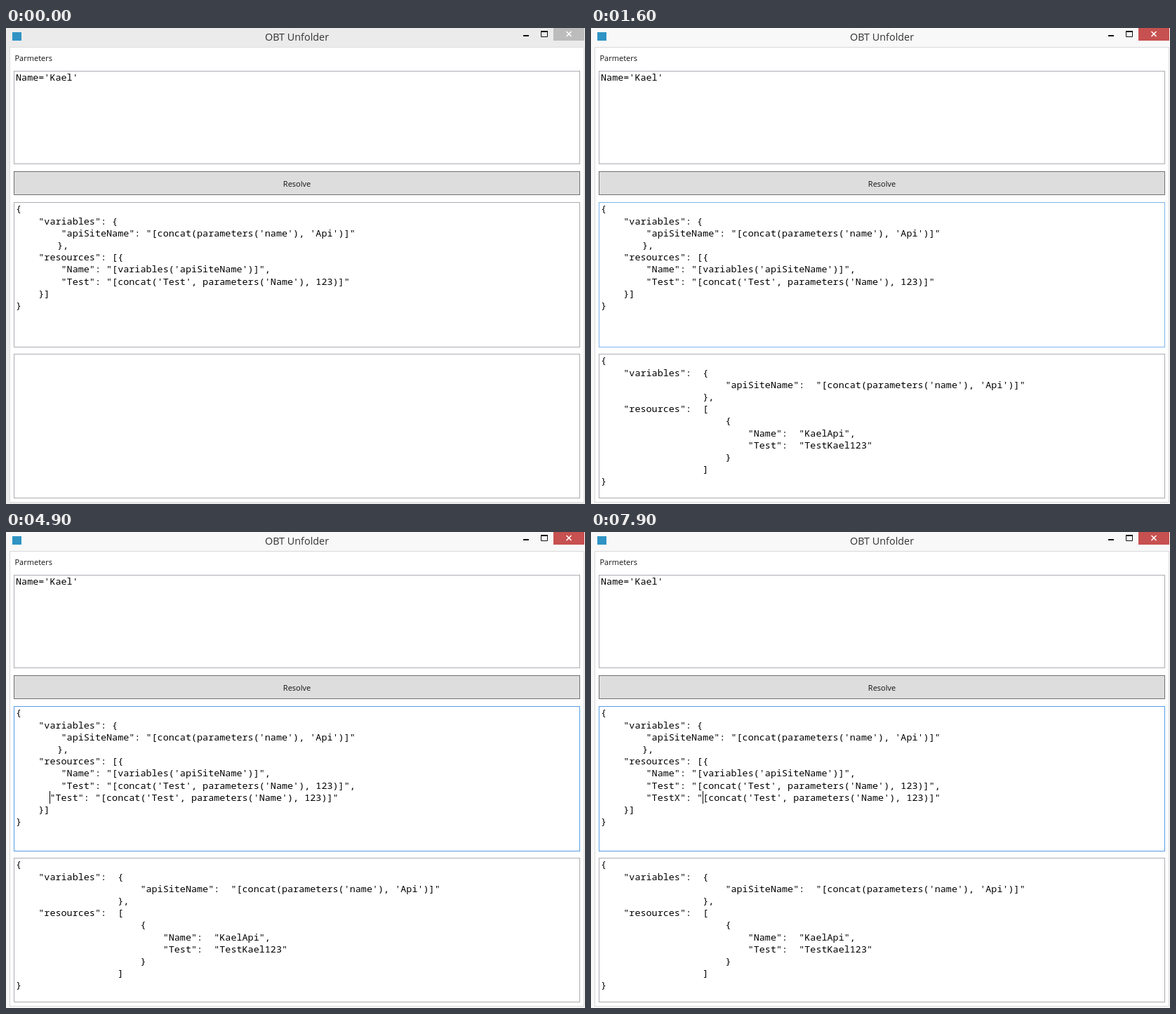
Write an HTML page that moves like this. It is 825 px wide and 678 px high and loops after 8000 ms.

```html
<!DOCTYPE html>
<html lang="en">
<head>
<meta charset="utf-8">
<title>OBT Unfolder</title>
<style>
  html, body { margin: 0; width: 100%; height: 100%; overflow: hidden; background: #fff; }
  svg { display: block; }
  .ui { font-family: "Open Sans", "Noto Sans", sans-serif; fill: #111; }
  .code { font: 13.45px "Noto Sans Mono", "DejaVu Sans Mono", monospace; white-space: pre; fill: #000; }
</style>
</head>
<body>
<svg id="stage" width="825" height="678" viewBox="0 0 825 678"></svg>
<script>
const LOOP = 8000;
const PERSON = 'Kael';
const BORDER = { idle: '#abadb3', hover: '#7eb4ea', focus: '#569de5' };
const BUTTON = {
  idle: ['#dddddd', '#707070'],
  hover: ['#bee6fd', '#3c7fb1'],
  pressed: ['#c4e5f6', '#2c628b']
};
const stage = document.getElementById('stage');

function add(tag, attrs, text) {
  const node = document.createElementNS('http://www.w3.org/2000/svg', tag);
  set(node, attrs);
  if (text) node.textContent = text;
  stage.append(node);
  return node;
}
function set(node, attrs) {
  for (const key in attrs) node.setAttribute(key, attrs[key]);
}
// Rectangle with a one pixel border lying inside the given edges.
function frame(left, top, right, bottom, fill, stroke) {
  return add('rect', {
    x: left + .5, y: top + .5, width: right - left - 1, height: bottom - top - 1, fill, stroke
  });
}
function label(text, x, y, size, anchor = 'start') {
  return add('text', { class: 'ui', x, y, 'font-size': size, 'text-anchor': anchor }, text);
}
// Empty lines of code for a text box whose border starts at boxTop.
function codeLines(count, boxTop) {
  return Array.from({ length: count }, (_, i) =>
    add('text', { class: 'code', x: 14, y: Math.round(boxTop + 14.4 + 17.2 * i) }));
}
function fillLines(nodes, lines) {
  nodes.forEach((node, i) => {
    const text = lines[i] || '';
    if (node.textContent !== text) node.textContent = text;
  });
}

// Window chrome
const chrome = add('rect', { width: 825, height: 678 });
const client = frame(5, 27, 824, 676, '#fff', '#d9d9d9');
add('rect', { x: 9, y: 6, width: 13, height: 12, fill: '#2f93c4' });
label('OBT Unfolder', 414.5, 17.5, 14.4, 'middle').style.fill = '#333';
add('rect', { x: 737, y: 10, width: 8, height: 2, fill: '#111' });
add('path', { d: 'M762.5 5V12.5H771.5V5M762 5H772', fill: 'none', stroke: '#111' });
add('rect', { x: 762, y: 4, width: 10, height: 2, fill: '#111' });
const closeButton = add('rect', { x: 780, y: 0, width: 44, height: 18 });
add('path', { d: 'M798.5 5L805.5 12M805.5 5L798.5 12', stroke: '#fff', 'stroke-width': 1.6 });

// Form
label('Parmeters', 12.5, 47, 11);
const paramBox = frame(11, 61, 818, 194, '#fff');
const button = frame(11, 204, 818, 238);
label('Resolve', 414.5, 226, 11, 'middle');
const sourceBox = frame(11, 248, 818, 455, '#fff');
frame(11, 464, 818, 670, '#fff', BORDER.idle);
fillLines(codeLines(1, 61), [`Name='${PERSON}'`]);
const sourceNodes = codeLines(10, 248);
set(sourceNodes[3], { dx: 2.5 });
const outputNodes = codeLines(11, 464);
const caret = add('rect', { width: 1, height: 18, fill: '#000' });

const pad = (n, text) => ' '.repeat(n) + text;
const testLine = key => `"${key}": "[concat('Test', parameters('Name'), 123)]"`;
const sourceHead = [
  '{',
  pad(4, '"variables": {'),
  pad(8, `"apiSiteName": "[concat(parameters('name'), 'Api')]"`),
  pad(7, '},'),
  pad(4, '"resources": [{'),
  pad(8, `"Name": "[variables('apiSiteName')]",`)
];
const sourceTail = [pad(4, '}]'), '}'];
const output = [
  '{',
  pad(4, '"variables":  {'),
  pad(22, `"apiSiteName":  "[concat(parameters('name'), 'Api')]"`),
  pad(18, '},'),
  pad(4, '"resources":  ['),
  pad(22, '{'),
  pad(26, `"Name":  "${PERSON}Api",`),
  pad(26, `"Test":  "Test${PERSON}123"`),
  pad(22, '}'),
  pad(18, ']'),
  '}'
];

// Each step changes part of the state; caret is an x position, 0 hides it.
const steps = [
  [0, { active: false, param: 'idle', button: 'idle', source: 'idle', output: false,
        comma: '', newLine: null, caret: 0, row: 6 }],
  [300, { param: 'hover' }],
  [600, { param: 'idle' }],
  [800, { button: 'hover' }],
  [1100, { button: 'pressed', active: true }],
  [1300, { button: 'hover', output: true }],
  [1600, { button: 'idle', source: 'hover' }],
  [2000, { source: 'focus', caret: 490 }],
  [2500, { caret: 0 }],
  [2900, { comma: ',', caret: 498 }],
  [3200, { newLine: '', caret: 0, row: 7 }],
  [3300, { caret: 14 }],
  [3700, { caret: 0 }],
  [3900, { newLine: testLine('Test'), caret: 425 }],
  [4200, { caret: 14 }],
  indent(4300, 1, 22),
  indent(4500, 2, 29),
  indent(4600, 3, 38),
  indent(4700, 4, 46),
  indent(4800, 5, 54),
  indent(4900, 6, 62),
  indent(5100, 7, 70),
  indent(5200, 8, 77),
  indent(5400, 9, 86),
  [5900, { caret: 0 }],
  indent(6100, 8, 77),
  [6300, { caret: 86 }],
  [6500, { caret: 102 }],
  [6700, { caret: 110 }],
  [6800, { caret: 119 }],
  [7200, { newLine: pad(8, testLine('TestX')), caret: 126 }],
  [7400, { caret: 134 }],
  [7900, { caret: 159 }]
];
function indent(time, spaces, x) {
  return [time, { newLine: pad(spaces, testLine('Test')), caret: x }];
}

function render(time) {
  const state = {};
  for (const [start, change] of steps) {
    if (start <= time) Object.assign(state, change);
  }
  set(chrome, { fill: state.active ? '#f8f8f8' : '#ebebeb' });
  set(client, { stroke: state.active ? '#d9d9d9' : '#dfdfdf' });
  set(closeButton, { fill: state.active ? '#c75050' : '#bcbcbc' });
  set(paramBox, { stroke: BORDER[state.param] });
  set(sourceBox, { stroke: BORDER[state.source] });
  const [fill, stroke] = BUTTON[state.button];
  set(button, { fill, stroke });

  const inserted = state.newLine === null ? [] : [state.newLine];
  fillLines(sourceNodes, [
    ...sourceHead, pad(8, testLine('Test') + state.comma), ...inserted, ...sourceTail
  ]);
  fillLines(outputNodes, state.output ? output : []);
  set(caret, {
    x: state.caret, y: 352 + 17 * (state.row - 6), visibility: state.caret ? 'visible' : 'hidden'
  });
}

const began = performance.now();
function tick() {
  render((performance.now() - began) % LOOP);
  requestAnimationFrame(tick);
}
tick();
</script>
</body>
</html>
```
